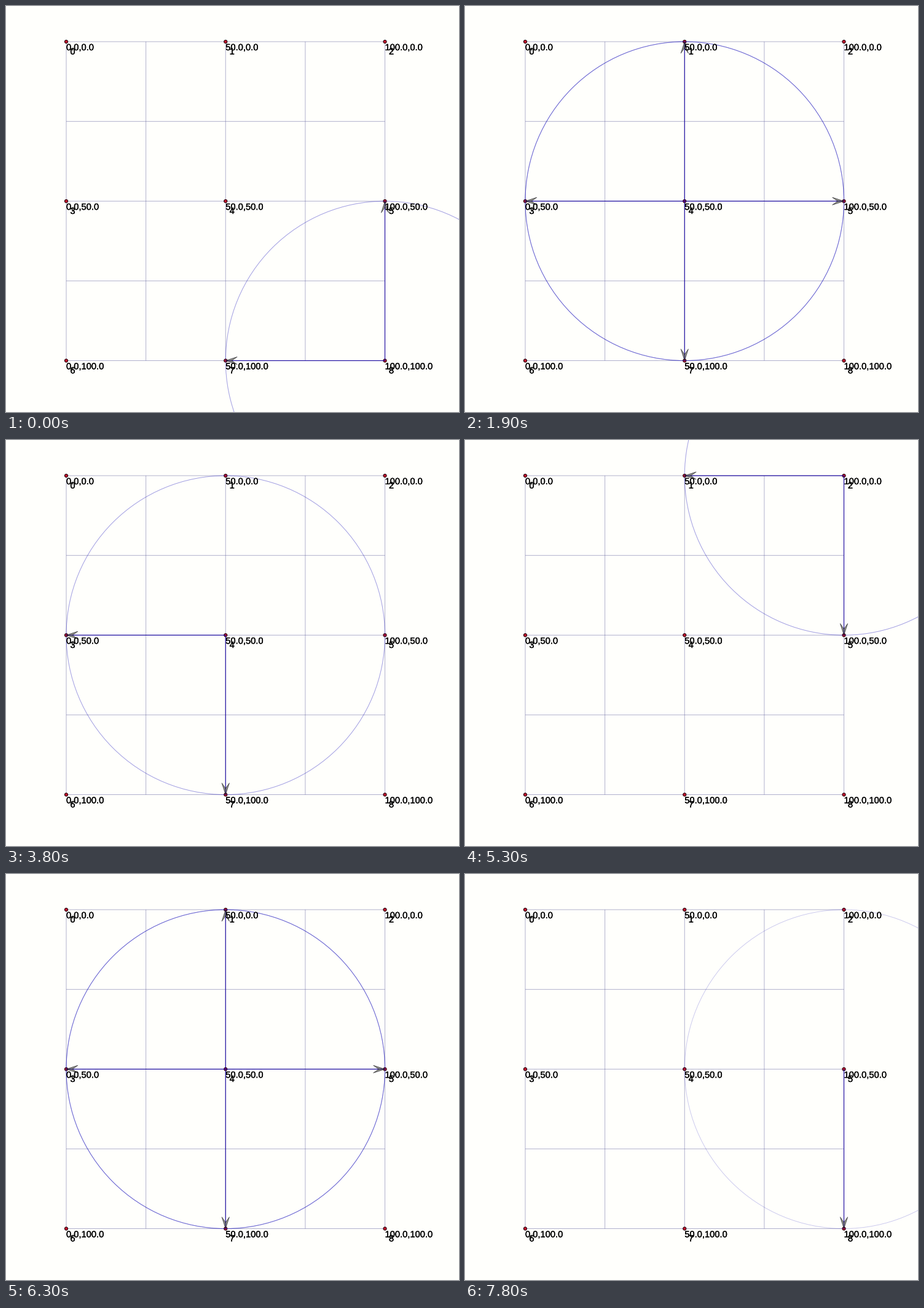
These frames come from a looping animation (737x660 px, 8000 ms). A matplotlib script:

```python
import math

import matplotlib.pyplot as plt
from matplotlib.animation import FuncAnimation
from matplotlib.patches import Circle, Polygon
from matplotlib.patheffects import Normal, Stroke

W, H, DPI = 737, 660, 100
PX = 72 / DPI                      # one pixel in points
STEP, LOOP = 100, 8000             # ms
TICK, LEAD = 495, 169              # length of a search tick and its head start, ms
SIDE = 3
LEFT, TOP, CELL = 98.0, 58.0, 259.25
HEAD, NOTCH, WING = 19, 10, 6.2

# start node, goal node, ticks on the first and on the last expansion
TRIPS = [(8, 0, 1, 1), (2, 7, 1, 1), (4, 1, 2, 1), (2, 7, 1, 3),
         (2, 7, 1, 1), (4, 1, 1, 0), (0, 8, 2, 1)]

plt.rcParams["text.hinting"] = "none"
plt.rcParams["text.hinting_factor"] = 1
plt.rcParams["font.family"] = "Liberation Sans"

fig = plt.figure(figsize=(W / DPI, H / DPI), dpi=DPI, facecolor="#fffffc")
ax = fig.add_axes([0, 0, 1, 1])
ax.set(xlim=(0, W), ylim=(H, 0))
ax.axis("off")


def cell(i):
    return i % SIDE, i // SIDE


def distance(i, j):
    return math.dist(cell(i), cell(j))


def search(start, goal):
    """Greedy best-first search; lists each node with its newly seen neighbours."""
    seen, queue, expanded = {start}, [start], []
    while goal not in seen:
        node = min(queue, key=lambda i: (distance(i, goal), i))
        queue.remove(node)
        fresh = tuple(i for i in range(SIDE * SIDE)
                      if distance(i, node) == 1 and i not in seen)
        seen.update(fresh)
        queue.extend(fresh)
        expanded.append((node, fresh))
    return expanded


def node_pos(i):
    col, row = cell(i)
    return LEFT + col * CELL, TOP + row * CELL


def line(a, b, color, width, alpha, z):
    return ax.plot([a[0], b[0]], [a[1], b[1]], color=color, lw=width * PX,
                   alpha=alpha, zorder=z, solid_capstyle="butt", snap=False)[0]


def draw_grid():
    size = (SIDE - 1) * CELL
    for k in range(2 * SIDE - 1):
        d = k * CELL / 2
        line((LEFT + d, TOP), (LEFT + d, TOP + size), "#6464a0", 1, 0.5, 1)
        line((LEFT, TOP + d), (LEFT + size, TOP + d), "#6464a0", 1, 0.5, 1)


def draw_node(i):
    x, y = node_pos(i)
    col, row = cell(i)
    bolder = [Stroke(linewidth=0.3 * PX, foreground="black"), Normal()]
    style = dict(fontsize=14.7 * PX, color="black", va="baseline",
                 path_effects=bolder, zorder=5)
    ax.add_patch(Circle((x, y), 2.6, fc="#c0142c", ec="#200008", lw=PX, zorder=2))
    ax.text(x, y + 14, f"{col * 50:.1f},{row * 50:.1f}", **style)
    ax.text(x + 6.4, y + 20.7, str(i), **style)


def draw_arrow(i, j):
    """Edge i -> j with its reach circle and a notched head."""
    a, b = node_pos(i), node_pos(j)
    ux, uy = (b[0] - a[0]) / CELL, (b[1] - a[1]) / CELL
    ring = Circle(a, CELL, fill=False, ec="#1008bc", lw=0.95 * PX,
                  alpha=0.22, zorder=3)
    shaft = line(a, b, "#1400a0", 1.2, 0.9, 3)
    outline = [(0, 0), (HEAD, WING), (NOTCH, 0), (HEAD, -WING)]
    head = Polygon([(b[0] - ux * s - uy * t, b[1] - uy * s + ux * t)
                    for s, t in outline],
                   fc=(0.2, 0.2, 0.2, 0.55), ec=(0.1, 0.1, 0.1, 0.7),
                   lw=0.8 * PX, joinstyle="miter", snap=False, zorder=4)
    ax.add_patch(ring)
    ax.add_patch(head)
    return [ring, shaft, head]


draw_grid()
for n in range(SIDE * SIDE):
    draw_node(n)

ticks = []
for start, goal, hold_first, hold_last in TRIPS:
    steps = search(start, goal)
    ticks += [steps[0]] * hold_first + [steps[-1]] * hold_last

groups = {(src, fresh): [p for dst in fresh for p in draw_arrow(src, dst)]
          for src, fresh in dict.fromkeys(ticks)}


def update(frame):
    active = ticks[(frame * STEP + LEAD) // TICK]
    for key, parts in groups.items():
        for part in parts:
            part.set_visible(key == active)
    return []


anim = FuncAnimation(fig, update, frames=LOOP // STEP, interval=STEP,
                     init_func=lambda: update(0), repeat=True,
                     repeat_delay=0, blit=False)
plt.show()
```
